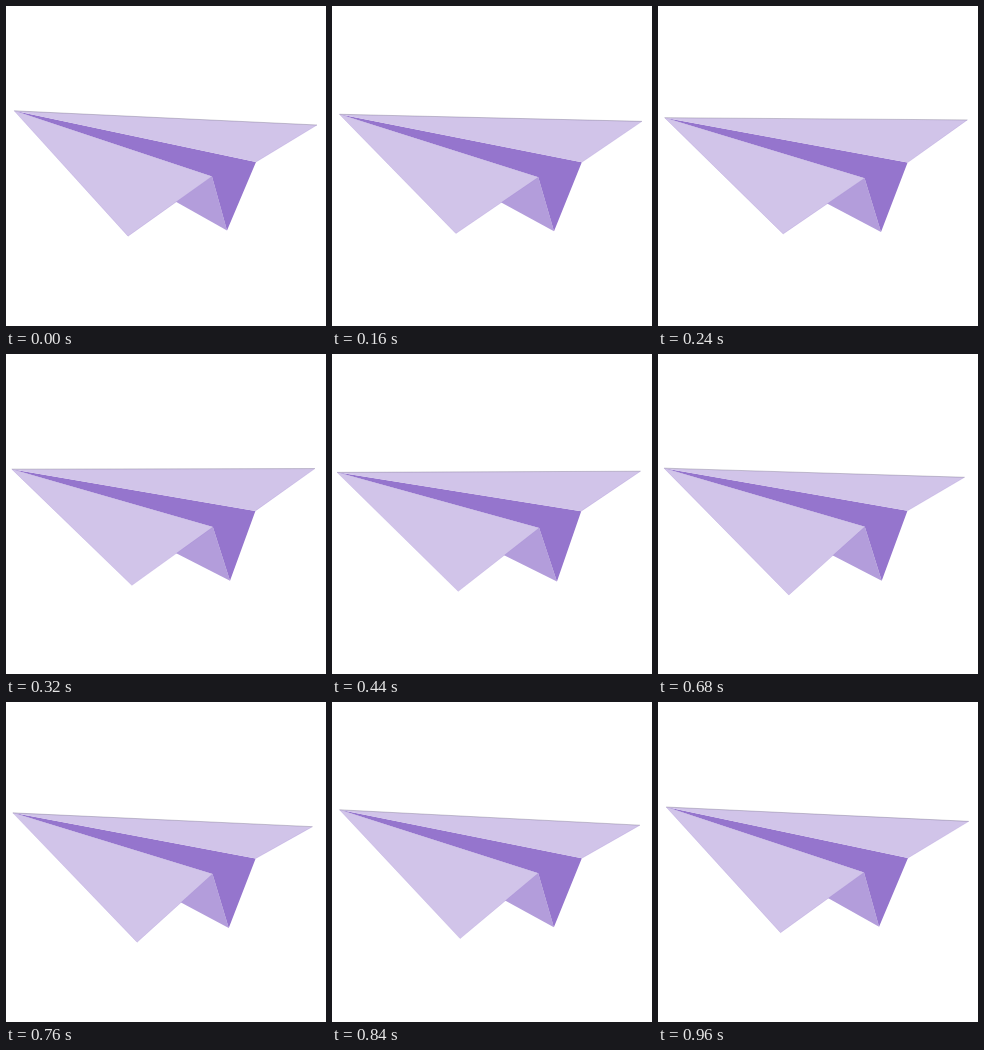
Animation of 320 by 320 pixels, one loop 1 s. Source, as an HTML page with a canvas:

```html
<!DOCTYPE html>
<html lang="en">
<head>
<meta charset="utf-8">
<title>Paper plane</title>
<style>
html, body { margin: 0; width: 100%; height: 100%; overflow: hidden; background: #fff; }
canvas { display: block; width: 100vw; height: 100vh; }
</style>
</head>
<body>
<canvas id="stage"></canvas>
<script>
const SIZE = 320, LOOP = 1000, STEP = 40;
const LIGHT = '#d1c4e9', MID = '#b39ddb', DARK = '#9575cd';
const canvas = document.getElementById('stage');
const ctx = canvas.getContext('2d');

// Body points: level pose and pitched pose
const BODY = {
  nose: [[8.2, 104.8], [5, 118.6]],
  fold: [[250, 156], [249.2, 157.2]],
  inner: [[206, 170.4], [207.2, 174]],
  keel: [[221, 224.6], [225, 227.6]]
};
const BEATS = [0, 240, 490, 750, 1000];
const LEFT_X = [122, 123.3, 122.5, 129.5, 122];
const LEFT_Y = [230.2, 224, 230.2, 236.8, 230.2];
const RIGHT_X = [311, 310.2, 310.2, 307.2, 311];
const RIGHT_Y = [119, 114.6, 119, 125.3, 119];

const lerp = (a, b, k) => a + (b - a) * k;
const ease = p => (1 - Math.cos(Math.PI * p)) / 2;

function keyed(times, values, t) {
  let i = 0;
  while (i < times.length - 2 && t >= times[i + 1]) i++;
  const p = (t - times[i]) / (times[i + 1] - times[i]);
  return lerp(values[i], values[i + 1], ease(p));
}

function trace(points) {
  ctx.beginPath();
  for (const [x, y] of points) ctx.lineTo(x, y);
}

function fill(color, ...points) {
  trace(points);
  ctx.closePath();
  ctx.fillStyle = color;
  ctx.fill();
}

function line(color, width, ...points) {
  trace(points);
  ctx.strokeStyle = color;
  ctx.lineWidth = width;
  ctx.stroke();
}

function draw(t) {
  const scale = canvas.width / SIZE;
  ctx.setTransform(scale, 0, 0, canvas.height / SIZE, 0, 0);
  ctx.fillStyle = '#fff';
  ctx.fillRect(0, 0, SIZE, SIZE);

  const pitch = keyed([0, 480, 1000], [0, 1, 0], t);
  const at = ([a, b]) => [lerp(a[0], b[0], pitch), lerp(a[1], b[1], pitch)];
  const nose = at(BODY.nose), fold = at(BODY.fold);
  const inner = at(BODY.inner), keel = at(BODY.keel);

  // Wing tips flap on top of the body pitch
  const left = [
    keyed(BEATS, LEFT_X, t) + 3.7 * pitch,
    keyed(BEATS, LEFT_Y, t) + 7.9 * pitch
  ];
  const right = [
    keyed(BEATS, RIGHT_X, t) - 1.7 * pitch,
    keyed(BEATS, RIGHT_Y, t) - 1.4 * pitch
  ];

  fill(MID, nose, inner, keel);
  fill(DARK, nose, fold, keel, inner);
  fill(LIGHT, nose, right, fold);
  fill(LIGHT, nose, left, inner);
  line('rgba(70,60,90,0.45)', 0.6, nose, right);
  line('rgba(149,117,205,0.45)', 0.5, right, fold);
  line('rgba(149,117,205,0.45)', 0.5, nose, left, inner);
}

function resize() {
  const ratio = window.devicePixelRatio || 1;
  canvas.width = Math.round(innerWidth * ratio);
  canvas.height = Math.round(innerHeight * ratio);
}

const start = performance.now();
function tick() {
  const t = (performance.now() - start) % LOOP;
  draw(Math.floor(t / STEP) * STEP);
  requestAnimationFrame(tick);
}

addEventListener('resize', resize);
resize();
tick();
</script>
</body>
</html>
```
